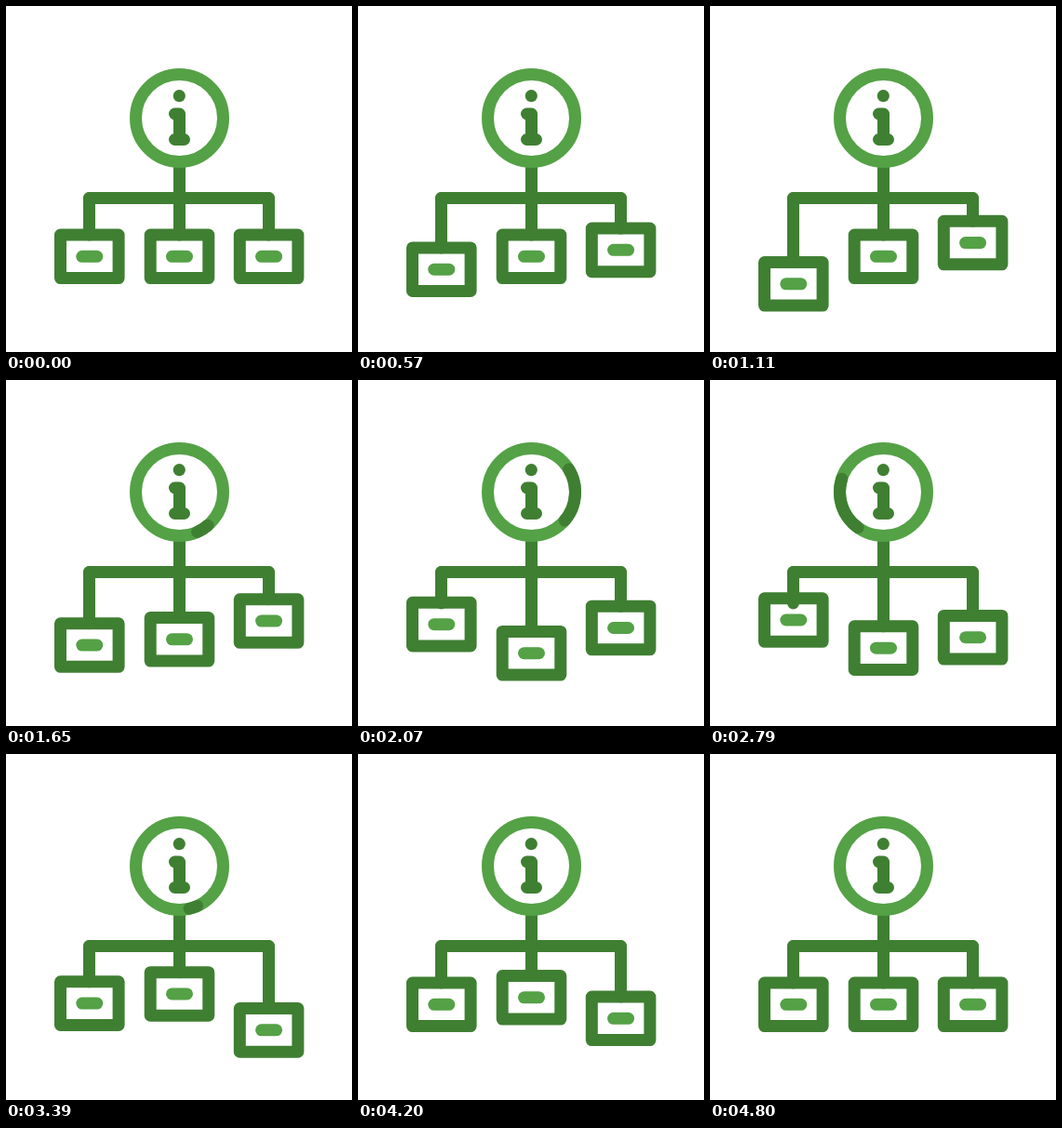
Animation of 372x372 px, one loop 4.83 s. Source, as an HTML page:

```html
<!DOCTYPE html>
<html lang="en">
<head>
<meta charset="utf-8">
<title>Information tree</title>
<style>
  html, body { margin: 0; width: 100%; height: 100%; overflow: hidden; background: #fff; }
  svg { display: block; width: 100%; height: 100%; }
  svg * { fill: none; stroke: #3f7f32; stroke-width: 13; stroke-linecap: round; stroke-linejoin: round; }
  svg .light { stroke: #54a146; }
  svg .dot { fill: #3f7f32; stroke: none; }
</style>
</head>
<body>
<svg viewBox="0 0 372 372">
  <path d="M89.5 240V206.5H282.5V225M186.5 206.5V168"/>
  <g id="boxes"></g>
  <circle class="light" cx="186.5" cy="120.5" r="47"/>
  <path id="arc"/>
  <circle class="dot" cx="186.3" cy="96.6" r="6.6"/>
  <path d="M181.5 116H186.5V143.5M181.5 143.5H191.5"/>
</svg>
<script>
const LOOP = 4830, STEP = 1200;
const RING = { x: 186.5, y: 120.5, r: 47, start: 66 };
const SWEEP = { from: 1390, to: 3600, length: 72 };

// Vertical offset of each box at every STEP.
const BOXES = [
  { x: 89.8, dy: [0, 30, -15, 0, 0] },
  { x: 186.5, dy: [0, 0, 30, -15, 0] },
  { x: 282.6, dy: [0, -15, 0, 30, 0] }
];

const clamp = (v, lo, hi) => Math.min(hi, Math.max(lo, v));
const ease = p => p * p * (3 - 2 * p);

function add(parent, tag, attrs) {
  const el = document.createElementNS('http://www.w3.org/2000/svg', tag);
  for (const key in attrs) el.setAttribute(key, attrs[key]);
  return parent.appendChild(el);
}

const layer = document.getElementById('boxes');
const arc = document.getElementById('arc');

for (const box of BOXES) {
  box.wire = add(layer, 'path', {});
  box.node = add(layer, 'g', {});
  add(box.node, 'rect', { x: box.x - 31.3, y: 246, width: 62.6, height: 46.6 });
  add(box.node, 'path', { class: 'light', d: `M${box.x - 8} 269.3h16` });
}

function offsetAt(dy, t) {
  const i = Math.min(Math.floor(t / STEP), dy.length - 2);
  const p = clamp(t / STEP - i, 0, 1);
  return dy[i] + (dy[i + 1] - dy[i]) * ease(p);
}

function ringPoint(travel) {
  const a = (RING.start - travel) * Math.PI / 180;
  return `${RING.x + RING.r * Math.cos(a)} ${RING.y + RING.r * Math.sin(a)}`;
}

function drawArc(t) {
  const p = clamp((t - SWEEP.from) / (SWEEP.to - SWEEP.from), 0, 1);
  const travel = ease(p) * (360 + SWEEP.length);
  const head = Math.min(travel, 360);
  const tail = Math.max(travel - SWEEP.length, 0);
  arc.style.display = p > 0 && p < 1 ? '' : 'none';
  arc.setAttribute('d', `M${ringPoint(tail)}A${RING.r} ${RING.r} 0 0 0 ${ringPoint(head)}`);
}

function draw(now) {
  const t = now % LOOP;
  for (const { x, dy, wire, node } of BOXES) {
    const y = offsetAt(dy, t);
    node.setAttribute('transform', `translate(0 ${y})`);
    wire.setAttribute('d', `M${Math.round(x * 2 - 0.4) / 2} 206.5V${246 + y}`);
  }
  drawArc(t);
}

let start;
function tick(now) {
  start ??= now;
  draw(now - start);
  requestAnimationFrame(tick);
}
draw(0);
requestAnimationFrame(tick);
</script>
</body>
</html>
```
